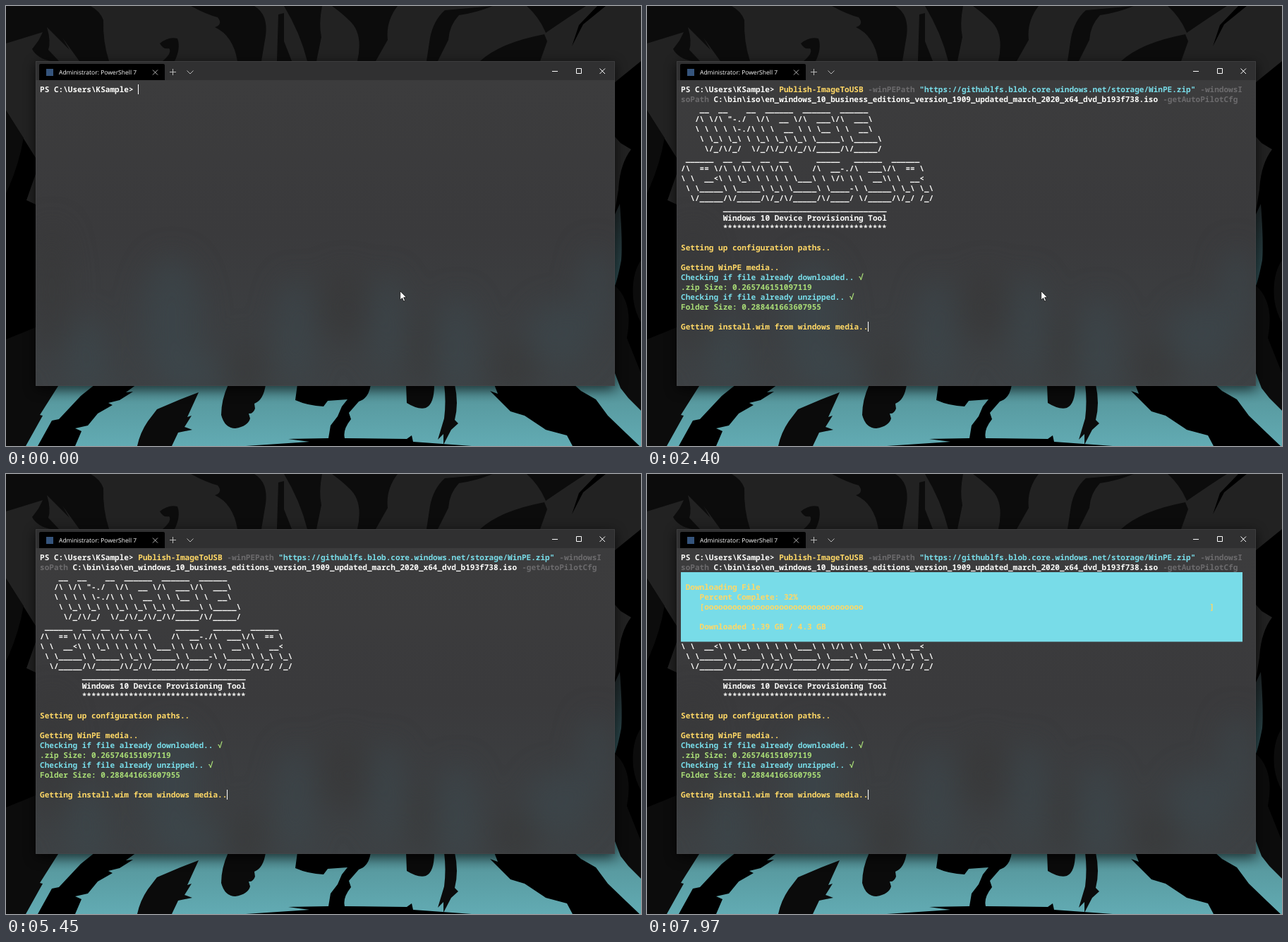
Write an HTML page that moves like this. It is 900 px wide and 623 px high and loops after 8 s.

```html
<!DOCTYPE html>
<html lang="en">
<head>
<meta charset="utf-8">
<title>Terminal</title>
<style>
html, body { margin: 0; width: 100%; height: 100%; overflow: hidden; background: #000; }
svg { display: block; width: 900px; height: 623px; }
#screen { font: 600 11.055px "Noto Sans Mono", "DejaVu Sans Mono", monospace; text-rendering: geometricPrecision; font-variant-ligatures: none; }
.tab { font: 8.5px "Open Sans", "Noto Sans", sans-serif; text-rendering: geometricPrecision; }
</style>
</head>
<body>
<svg viewBox="0 0 900 623">
  <defs>
    <linearGradient id="teal" x1="0" y1="530" x2="0" y2="623" gradientUnits="userSpaceOnUse">
      <stop offset="0" stop-color="#4b8388"/><stop offset=".35" stop-color="#599ba1"/><stop offset="1" stop-color="#62abb3"/>
    </linearGradient>
    <linearGradient id="glass" x1="0" y1="105" x2="0" y2="538" gradientUnits="userSpaceOnUse">
      <stop offset="0" stop-color="#3c3c3d"/><stop offset=".5" stop-color="#3a3a3c"/><stop offset="1" stop-color="#3d4144"/>
    </linearGradient>
    <linearGradient id="sliver" x1="0" y1="280" x2="0" y2="396" gradientUnits="userSpaceOnUse">
      <stop offset="0" stop-color="#1e2426"/><stop offset="1" stop-color="#2d4e53"/>
    </linearGradient>
    <filter id="shadow" x="-10%" y="-10%" width="120%" height="125%" color-interpolation-filters="sRGB"><feGaussianBlur stdDeviation="9"/></filter>
    <filter id="soft" x="-100%" y="-100%" width="300%" height="300%" color-interpolation-filters="sRGB"><feGaussianBlur stdDeviation="20"/></filter>
    <clipPath id="body"><path d="M42 105H863V538H42Z"/></clipPath>
  </defs>

  <g id="wallpaper">
    <path d="M0 0H900V623H0Z"/>
    <path fill="#222" d="M0 0H900V78L863 108V78H42V215L0 148Z"/>
    <g fill="#0c0c0c">
      <path d="M52 37L46 49L37 61Q44 74 63 78L75 78L60 62Q64 50 58 30L90 62L80 45L104 78H146Q137 50 138 20Q134 8 120 0H0V53Z"/>
      <path d="M218 53Q230 43 243 46Q248 60 239 78H222Q236 66 231 60Q223 62 218 53Z"/>
      <path d="M262 0H352Q372 12 368 42L362 78H328Q322 42 296 30Q308 26 300 16Q284 12 262 0Z"/>
      <path d="M386 12L394 10V50L405 78H384Z"/>
      <path d="M394 0H448Q443 25 447 44L440 78H427Q417 38 394 0Z"/>
      <path d="M462 0H555Q538 22 541 48L524 78H498Q507 38 486 20Q476 10 462 0Z"/>
      <path d="M601 45Q606 20 622 6L690 0Q665 10 642 13Q628 28 627 48L612 78H596Z"/>
      <path d="M672 78Q700 52 763 40L767 50L757 78Z"/>
      <path d="M738 0H822Q800 14 765 38Q756 16 738 0Z"/>
      <path d="M0 148L25 187Q17 230 0 265Z"/>
      <path d="M0 472L42 455V538H75L28 623H0Z"/>
      <path d="M863 396Q890 420 880 470L900 520V623L863 590Z"/>
      <path d="M900 360Q886 380 889 415Q892 435 900 448Z"/>
    </g>
    <path d="M802 57L818 26L850 0H838L812 27Z"/>
    <path fill="#222" d="M42 238L29 275L42 281ZM863 185L871 194L886 203Q870 224 868 260L863 290Z"/>
    <path fill="url(#sliver)" d="M863 295L870 280Q874 335 872 360Q867 386 863 396Z"/>
    <path fill="url(#teal)" d="M60 530H800L863 520L871 541L882 555L900 573V623H28L52 580L48 579L74 538Z"/>
    <path d="M126 536H185L170 547L180 546L161 558L145 562L151 565L130 577L116 594L98 598L107 602L98 623H45L65 587L75 585L106 552Z"/>
    <path fill="#0b0b0b" d="M273 547L247 557L214 571L201 588Q190 604 186 623H235L244 604L264 600L253 596L263 580L257 582Z"/>
    <path fill="#0b0b0b" d="M315 536Q305 558 305 579Q310 598 325 598Q343 595 346 584L344 577Q350 578 353 570L352 563Q365 558 368 536Z"/>
    <path d="M413 536L410 558Q428 566 450 567L456 559L484 557L476 567L470 581L460 594L457 612L400 613L430 617L340 623H660L577 617L575 608L568 613L480 612Q477 600 489 585L486 576L500 560Q514 556 517 536Z"/>
    <path fill="#0b0b0b" d="M567 536L568 562Q584 572 595 569Q607 564 607 536ZM621 536Q624 560 621 584L612 614L620 606V621L631 600L641 591L636 586Q642 563 636 536Z"/>
    <path d="M686 545L697 549L692 536H805L815 545L836 557L853 580L879 605L898 623H803L795 608L765 600L735 580L715 574Z"/>
  </g>

  <path filter="url(#shadow)" opacity=".65" d="M42 82H863V543H42Z"/>
  <path fill="url(#glass)" d="M42 78H863V538H42Z"/>
  <g clip-path="url(#body)"><g id="blobs" filter="url(#soft)"></g></g>
  <path fill="#303031" d="M42 78H863V105H42Z"/>
  <path d="M47 105V84Q47 82 49 82H223Q225 82 225 84V105Z"/>
  <path fill="none" stroke="#4b4b4c" stroke-opacity=".5" d="M42.5 78.5H862.5V537.5H42.5Z"/>
  <path fill="#35547c" d="M57 89H67V99H57Z"/>
  <text class="tab" x="75" y="97" fill="#fff">Administrator: PowerShell 7</text>
  <g fill="none" stroke="#b8b8b8">
    <path d="M208 90.500L215 97.500M215 90.500L208 97.500M232 93.500H241M236.500 89V98M256.500 91.500L261 96L265.500 91.500"/>
    <path stroke="#fff" d="M774 92.500H782M808.500 88.500H815.500V95.500H808.500ZM841.500 88.500L849 96M849 88.500L841.500 96"/>
  </g>

  <g id="screen"></g>
  <path id="pointer" fill="#fff" stroke="#111" stroke-width=".8" d="M0 0V12.500L2.900 9.800L4.900 14.400L6.900 13.500L4.900 9H8.800Z"/>
</svg>
<script>
const LOOP = 8000, LEFT = 48, TOP = 111, CELL = 796 / 120, ROW = 14;
const WHITE = '#fcfcfa', GREY = '#6c6b6d', YELLOW = '#ffd866', CYAN = '#78dce8', GREEN = '#a9dc76';
const screen = document.getElementById('screen');
const pointer = document.getElementById('pointer');

const banner = String.raw`
    __  __    __  ______  ______  ______
   /\ \/\ "-./  \/\  __ \/\  ___\/\  ___\
   \ \ \ \ \-./\ \ \  __ \ \ \__ \ \  __\
    \ \_\ \_\ \ \_\ \_\ \_\ \_____\ \_____\
     \/_/\/_/  \/_/\/_/\/_/\/_____/\/_____/
 ______  __  __  __  __      _____   ______  ______
/\  == \/\ \/\ \/\ \/\ \    /\  __-./\  ___\/\  == \
\ \  __<\ \ \_\ \ \ \ \ \___\ \ \/\ \ \  __\\ \  __<
 \ \_____\ \_____\ \_\ \_____\ \____-\ \_____\ \_\ \_\
  \/_____/\/_____/\/_/\/_____/\/____/ \/_____/\/_/ /_/`.split('\n').slice(1);

function add(parent, tag, attrs, text = '') {
  const node = document.createElementNS('http://www.w3.org/2000/svg', tag);
  for (const key in attrs) node.setAttribute(key, attrs[key]);
  node.textContent = text;
  return parent.appendChild(node);
}

// Every word starts on its own terminal cell.
function write(row, col, text, fill = WHITE) {
  for (const word of text.matchAll(/\S+/g)) {
    add(screen, 'text', {
      x: LEFT + (col + word.index) * CELL, y: TOP + row * ROW + 11.3, fill
    }, word[0]);
  }
}

function writeCommand() {
  write(0, 21, 'Publish-ImageToUSB', YELLOW);
  write(0, 40, '-winPEPath', GREY);
  write(0, 51, '"https://githublfs.blob.core.windows.net/storage/WinPE.zip"', CYAN);
  write(0, 111, '-windowsI', GREY);
  write(1, 0, 'soPath', GREY);
  write(1, 7, 'C:\\bin\\iso\\en_windows_10_business_editions_version_1909_updated_march_2020_x64_dvd_b193f738.iso');
  write(1, 103, '-getAutoPilotCfg', GREY);
}

function writeHeader() {
  banner.forEach((line, i) => write(2 + i, 0, line));
  write(12, 9, '_'.repeat(35));
  write(13, 9, 'Windows 10 Device Provisioning Tool');
  write(14, 9, '*'.repeat(35));
  write(16, 0, 'Setting up configuration paths..', YELLOW);
}

function writeSteps() {
  write(18, 0, 'Getting WinPE media..', YELLOW);
  write(19, 0, 'Checking if file already downloaded..', CYAN);
  write(19, 38, '√', GREEN);
  write(20, 0, '.zip Size: 0.265746151097119', GREEN);
  write(21, 0, 'Checking if file already unzipped..', CYAN);
  write(21, 36, '√', GREEN);
  write(22, 0, 'Folder Size: 0.288441663607955', GREEN);
  write(24, 0, 'Getting install.wim from windows media..', YELLOW);
}

function writeProgress(gigabytes) {
  const share = Math.floor(gigabytes / 4.3 * 100 + 0.01);
  add(screen, 'rect', { x: LEFT, y: 139, width: 796, height: 98.5, fill: CYAN });
  write(3, 1, 'Downloading File', YELLOW);
  write(4, 4, `Percent Complete: ${share}%`, YELLOW);
  write(5, 4, '[' + 'o'.repeat(Math.floor(share * 1.08)), YELLOW);
  write(5, 113, ']', YELLOW);
  write(7, 4, `Downloaded ${gigabytes.toFixed(2)} GB / 4.3 GB`, YELLOW);
}

// Start time, cursor row and column, and what is on screen besides the prompt.
const scenes = [
  { at: 0, cursor: [0, 21] },
  { at: 530, cursor: [0, 22], typed: 'P' },
  { at: 870, cursor: [0, 24], typed: 'Pub' },
  { at: 1420, cursor: [1, 119], level: 1 },
  { at: 2180, cursor: [2, 0], level: 1 },
  { at: 2290, cursor: [16, 32], level: 2 },
  { at: 2400, cursor: [24, 40], level: 3 },
  { at: 7410, cursor: [24, 40], level: 3, done: 1.17 },
  { at: 7750, cursor: [24, 40], level: 3, done: 1.30 },
  { at: 7970, cursor: [24, 40], level: 3, done: 1.39 }
];
const blinks = [430, 530, 1950, 2180, 2710, 3260, 3810, 4370, 4900, 5450, 6000, 6550, 7080, 7630];

let shown, cursor;
function draw(scene) {
  screen.textContent = '';
  write(0, 0, 'PS C:\\Users\\KSample>');
  if (scene.typed) write(0, 21, scene.typed, YELLOW);
  if (scene.level >= 1) writeCommand();
  if (scene.level >= 2) writeHeader();
  if (scene.level >= 3) writeSteps();
  if (scene.done) writeProgress(scene.done);
  const [row, col] = scene.cursor;
  cursor = add(screen, 'rect', {
    x: Math.round(LEFT + col * CELL), y: TOP + row * ROW, width: 1, height: ROW, fill: '#fff'
  });
  shown = scene;
}

function update(time) {
  const scene = scenes.filter(s => s.at <= time).pop();
  if (scene !== shown) draw(scene);
  const off = blinks.filter(b => b <= time).length % 2;
  cursor.setAttribute('visibility', off ? 'hidden' : 'visible');
  const spot = time < 4130 ? '558.7 403.7' : time < 4250 ? '582 402' : '620.5 400.5';
  pointer.setAttribute('transform', `translate(${spot})`);
  pointer.setAttribute('visibility', time < 4370 ? 'visible' : 'hidden');
}

function blob(cx, cy, rx, ry, fill, opacity) {
  add(document.getElementById('blobs'), 'ellipse', { cx, cy, rx, ry, fill, opacity });
}
[[115, 500, 26, 60], [235, 440, 42, 85], [265, 520, 45, 25], [410, 460, 26, 75], [540, 450, 24, 70],
 [640, 480, 28, 70], [785, 465, 45, 45], [835, 400, 20, 60]].forEach(b => blob(...b, '#3d4b51', .5));
[[65, 400, 22, 90], [340, 520, 26, 50], [480, 425, 35, 50], [590, 490, 16, 60],
 [720, 515, 32, 42]].forEach(b => blob(...b, '#383738', .6));

const start = performance.now();
function tick() {
  update((performance.now() - start) % LOOP);
  requestAnimationFrame(tick);
}
tick();
</script>
</body>
</html>
```
